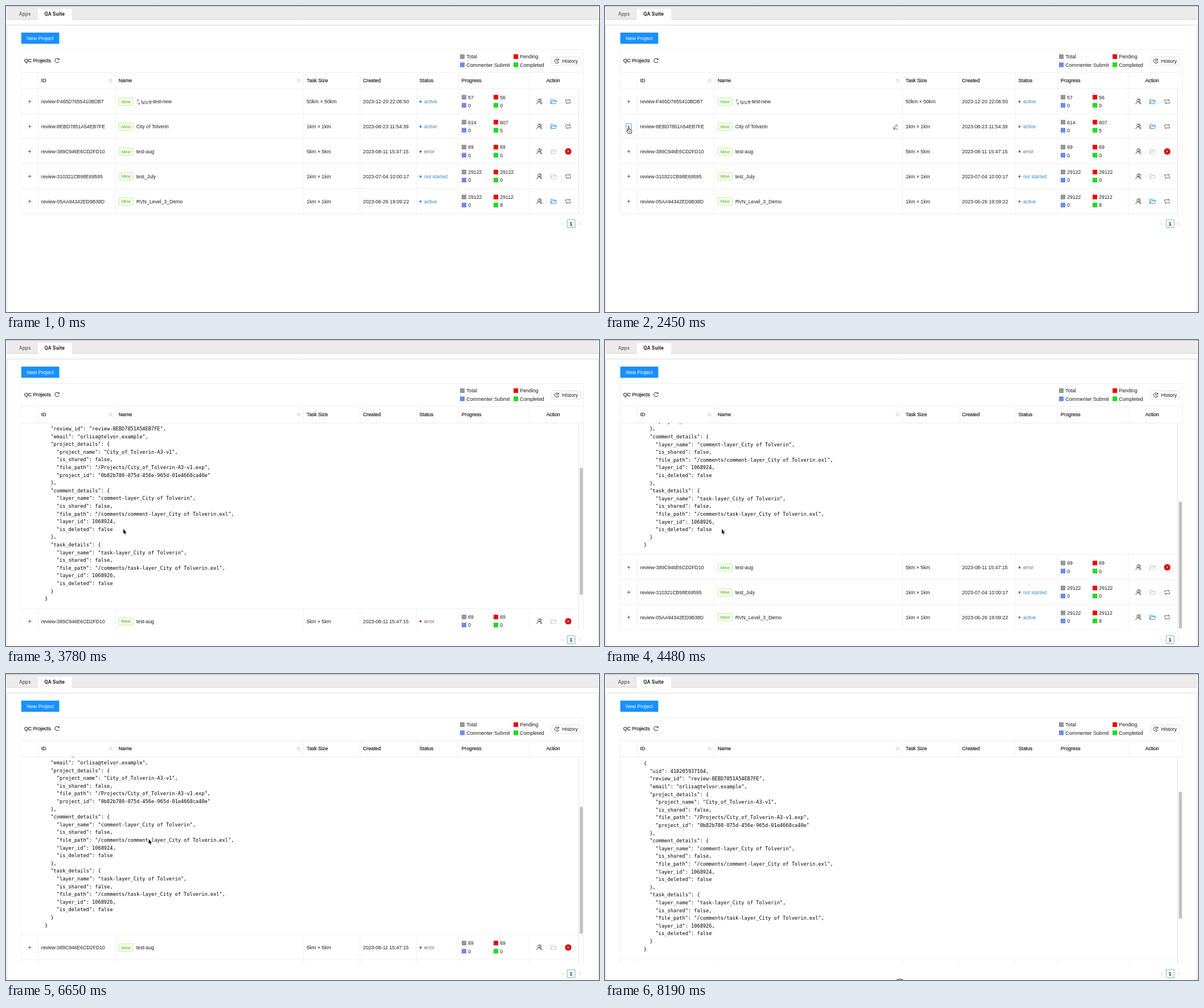
An HTML page with a canvas for the animation above (8260 ms loop, 1041 px wide and 538 px high).

```html
<!DOCTYPE html>
<html lang="en">
<head>
<meta charset="utf-8">
<title>Review projects</title>
<style>
html, body { margin: 0; width: 100%; height: 100%; overflow: hidden; background: #fff; }
canvas { display: block; width: 1041px; height: 538px; }
</style>
</head>
<body>
<canvas id="stage"></canvas>
<script>
const W = 1041, H = 538, LOOP = 8260;
const canvas = document.getElementById('stage');
const ctx = canvas.getContext('2d');
const dpr = window.devicePixelRatio || 1;
canvas.width = W * dpr;
canvas.height = H * dpr;

const SANS = '"Liberation Sans", Arial, sans-serif';
const MONO = '"DejaVu Sans Mono", monospace';
const TAB = 'Roboto, sans-serif';
const INK = '#1a1a1a', LINE = '#f0f0f0', BLUE = '#1890ff';
const GREY = '#999', RED = '#f00000', PERI = '#6c8cf0', GREEN = '#1ce01c';

const TOP = 146, ROW = 43.87, PANEL = 361.6, VIEW = 363.5;
const EXPAND_AT = 2520;
const COLS = [56.5, 192.5, 522.5, 621.5, 720.5, 794.5, 918.5];

const rows = [
  ['review-F465D7655410BDB7', '-test-new', '50km × 50km', '2023-12-20 22:06:50', 'active', 57, 56, 0, 0],
  ['review-8EBD7851A54EB7FE', 'City of Tolverin', '1km × 1km', '2023-08-23 11:54:39', 'active', 614, 607, 0, 5],
  ['review-389C946E6CD2FD10', 'test-aug', '5km × 5km', '2023-08-11 15:47:15', 'error', 69, 69, 0, 0],
  ['review-310321CB98E69595', 'test_July', '1km × 1km', '2023-07-04 10:00:17', 'not started', 29122, 29122, 0, 0],
  ['review-05AA94342ED9B38D', 'RVN_Level_3_Demo', '1km × 1km', '2023-06-26 19:09:22', 'active', 29122, 29112, 0, 8]
];

const layer = (kind, id) => ({
  layer_name: kind + '-layer_City of Tolverin',
  is_shared: false,
  file_path: '/comments/' + kind + '-layer_City of Tolverin.exl',
  layer_id: id,
  is_deleted: false
});
const details = JSON.stringify({
  uid: 418205937164,
  review_id: rows[1][0],
  email: 'orlisa@telvor.example',
  project_details: {
    project_name: 'City_of_Tolverin-A3-v1',
    is_shared: false,
    file_path: '/Projects/City_of_Tolverin-A3-v1.exp',
    project_id: '0b82b780-075d-456e-965d-01e4668ca40e'
  },
  comment_details: layer('comment', 1068924),
  task_details: layer('task', 1068926)
}, null, 2).split('\n');

// keys: [time, value, ...]
const pointerKeys = [
  [0, 517, 556], [70, 510, 542], [840, 62, 226], [1260, 41.5, 213], [2750, 41.5, 213],
  [3150, 206, 332], [4300, 206, 332], [4480, 205, 332], [5460, 205, 332],
  [5850, 250.5, 290], [6800, 250.5, 290], [7210, 517, 556]
];
const scrollKeys = [
  [3150, 0], [3780, 122.6], [4480, 217.6], [5850, 217.6],
  [6160, 189.5], [6370, 174], [6510, 174], [6650, 136.7], [7050, 94.5]
];

// Monotone cubic through the keys
function sample(keys, t, c) {
  const n = keys.length - 1;
  if (t <= keys[0][0]) return keys[0][c];
  if (t >= keys[n][0]) return keys[n][c];
  let i = 0;
  while (t > keys[i + 1][0]) i++;
  const slope = k => k < 0 || k >= n ? 0 : (keys[k + 1][c] - keys[k][c]) / (keys[k + 1][0] - keys[k][0]);
  const tangent = k => {
    const a = slope(k - 1), b = slope(k);
    return a * b <= 0 ? 0 : 2 * a * b / (a + b);
  };
  const h = keys[i + 1][0] - keys[i][0], u = (t - keys[i][0]) / h;
  const v = u * u * (3 - 2 * u);
  return keys[i][c] * (1 - v) + keys[i + 1][c] * v
    + h * u * (1 - u) * ((1 - u) * tangent(i) - u * tangent(i + 1));
}

function text(s, x, mid, color = INK, size = 8.7, family = SANS, weight = 400) {
  ctx.font = `${weight} ${size}px ${family}`;
  ctx.fillStyle = color;
  ctx.fillText(s, x, mid + size * 0.36);
}
function medium(s, x, mid, size = 8.7) {
  text(s, x, mid, INK, size);
  ctx.strokeStyle = INK;
  ctx.lineWidth = 0.2;
  ctx.strokeText(s, x, mid + size * 0.36);
}
function fill(x, y, w, h, color) {
  ctx.fillStyle = color;
  ctx.fillRect(x, y, w, h);
}
function line(x1, y1, x2, y2, color = LINE, width = 1) {
  ctx.strokeStyle = color;
  ctx.lineWidth = width;
  ctx.beginPath();
  ctx.moveTo(x1, y1);
  ctx.lineTo(x2, y2);
  ctx.stroke();
}
function box(x, y, w, h, r, stroke, bg) {
  ctx.beginPath();
  ctx.roundRect(x, y, w, h, r);
  if (bg) { ctx.fillStyle = bg; ctx.fill(); }
  if (stroke) { ctx.strokeStyle = stroke; ctx.lineWidth = 0.8; ctx.stroke(); }
}
function dot(x, y, r, color) {
  ctx.fillStyle = color;
  ctx.beginPath();
  ctx.arc(x, y, r, 0, 7);
  ctx.fill();
}
function icon(d, x, y, color, width = 0.9) {
  ctx.save();
  ctx.translate(x, y);
  ctx.strokeStyle = color;
  ctx.lineWidth = width;
  ctx.stroke(new Path2D(d));
  ctx.restore();
}
function swatch(x, mid, color) {
  fill(x, mid - 4, 8, 8, color);
  ctx.strokeStyle = 'rgba(0,0,0,.14)';
  ctx.lineWidth = 0.6;
  ctx.strokeRect(x + 0.3, mid - 3.7, 7.4, 7.4);
}

const ICONS = {
  search: 'M2 -.5A2.4 2.4 0 1 1 -2.8 -.5A2.4 2.4 0 1 1 2 -.5M1.3 1.3L3.3 3.3',
  reload: 'M3 -2.4A3.7 3.7 0 1 0 3.5 1.4M3.7 -4V-1.7H1.3',
  history: 'M2.8 -2.5A3.8 3.8 0 1 0 3.7 1M3.5 -3.7V-1.6H1.5M0 -2.2V.5L1.8 1.5',
  users: 'M1.4 -1.8A2 2 0 1 1 -2.6 -1.8A2 2 0 1 1 1.4 -1.8M-4.7 4.7Q-3.9 1 -.6 .3Q2 1 2.6 4.7M-.6 -4.6Q3.4 -5.4 3.7 -2.2Q3.6 -.2 1.6 .4Q4.2 1.4 4.8 4.6',
  folder: 'M-4.9 3.8V-3.8H-1.6L-.3 -2.4H3.4V-.7M-4.9 3.8L-3 -.7H5.3L3.5 3.8Z',
  repeat: 'M-4.2 .6V-2.7H3.6M2.2 -4.1L3.8 -2.7L2.2 -1.3M4.2 -.6V2.7H-3.6M-2.2 1.3L-3.8 2.7L-2.2 4.1',
  edit: 'M-3.2 1.8L2 -3.4L3.6 -1.8L-1.6 3.2L-3.5 3.4ZM-4 4.6H4'
};

function drawFrame(open) {
  fill(0, 0, W, H, '#fff');
  fill(1, 0, W - 2, 24, '#ebebeb');
  line(0, 0.5, W, 0.5, '#b9b9b9');
  line(1, 23.5, W - 1, 23.5, '#d6d6d6');
  fill(56, 5, 60, 19, '#fff');
  ctx.letterSpacing = '0.2px';
  text('Apps', 23, 13.7, '#666', 8.7, TAB, 500);
  text('QA Suite', 67.5, 13.7, '#222', 8.7, TAB, 700);
  ctx.letterSpacing = '0px';

  ctx.strokeStyle = '#dcdcdc';
  ctx.lineWidth = 1;
  ctx.strokeRect(1.5, 33.5, 1038, 520);

  box(26.8, 46.8, 66.7, 19.6, 1, null, BLUE);
  text('New Project', 36.5, 56.7, '#fff', 8.75);

  const bottom = open ? TOP + VIEW : TOP + ROW * 5;
  ctx.strokeStyle = LINE;
  ctx.strokeRect(26.5, 76.5, 987, (open ? TOP : bottom) - 76.5);
  medium('QC Projects', 32, 95.7, 8.7);
  icon(ICONS.reload, 89.5, 96, INK, 1);

  swatch(797, 89, GREY);
  text('Total', 808.3, 89.2, INK, 8.85);
  swatch(891, 89, RED);
  text('Pending', 902, 89.2, INK, 8.85);
  swatch(797, 103.4, PERI);
  text('Commenter Submit', 808.3, 103.5, INK, 8.85);
  swatch(891, 103.4, GREEN);
  text('Completed', 902, 103.5, INK, 8.85);
  box(958, 89.5, 50.5, 14.5, 1, '#d9d9d9', '#fff');
  icon(ICONS.history, 967, 96.8, INK, 0.9);
  text('History', 976.3, 97, INK, 8.85);

  line(27, 116.5, 1013, 116.5);
  line(27, 145.5, 1013, 145.5);
  COLS.forEach(x => line(x, 117, x, 146));
  const heads = ['ID', 'Name', 'Task Size', 'Created', 'Status', 'Progress'];
  heads.forEach((s, i) => medium(s, COLS[i] + 5.3, 131.2));
  medium('Action', 948.5, 131.2);
  icon(ICONS.search, 183.7, 131.2, '#bfbfbf');
  icon(ICONS.search, 513.8, 131.2, '#bfbfbf');

  const py = bottom + 17.4;
  icon('M1.6 -3L-1.6 0L1.6 3', 977.3, py, '#bbb', 0.8);
  box(985.2, py - 7, 13.8, 14, 1, '#489fc8', '#fff');
  text('1', 989.6, py, INK, 8.7, SANS, 700);
  icon('M-1.6 -3L1.6 0L-1.6 3', 1007.2, py, '#bbb', 0.8);
}

function drawMosaic(mid) {
  fill(229.5, mid - 4, 4, 3, '#b5b5b5');
  fill(230, mid - 1, 2.5, 3.5, '#cfcfcf');
  fill(232, mid + 2.5, 3, 3, '#999');
  for (let i = 0; i < 12; i++) {
    const v = 120 + (i * 67 + 31) % 120;
    fill(237 + (i % 6) * 3, mid - 1.5 + Math.floor(i / 6) * 3, 3, 3, `rgb(${v},${v},${v})`);
  }
}

function drawRow(row, i, y, hover, onToggle, open) {
  const [id, name, size, created, status, total, pending, sent, done] = row;
  const mid = y + ROW / 2;
  COLS.forEach(x => line(x, y, x, y + ROW));
  line(27, y + ROW - 0.4, 1013, y + ROW - 0.4);

  const tint = onToggle ? BLUE : '#333';
  box(36.8, mid - 5.2, 9.8, 10.4, 1, onToggle ? '#3c8ab8' : '#f5f5f5', '#fff');
  line(38.9, mid, 44.5, mid, tint, 0.8);
  if (!(open && i === 1)) line(41.7, mid - 2.8, 41.7, mid + 2.8, tint, 0.8);

  text(id, 61.8, mid, INK, 8.65);
  box(198, mid - 6.5, 25.4, 13.2, 1, '#b7eb8f', '#f6ffed');
  text('Mine', 202.7, mid + 0.2, '#45ad20', 7.5);
  if (i === 0) drawMosaic(mid);
  text(name, i === 0 ? 255 : 228.7, mid);
  if (hover) icon(ICONS.edit, 510, mid, '#333', 0.8);
  text(size, 527.8, mid);
  text(created, 626.8, mid);

  const failed = status === 'error';
  dot(727.7, mid + 0.2, 1.9, failed ? '#86505a' : '#2f86cf');
  text(status, 734, mid, failed ? '#7d5c60' : '#3489cf');

  [[800, -7.6, GREY, total], [856, -7.6, RED, pending], [800, 6.6, PERI, sent], [856, 6.6, GREEN, done]]
    .forEach(([x, dy, color, n]) => {
      swatch(x, mid + dy, color);
      text(n, x + 11.2, mid + dy + 0.2);
    });

  icon(ICONS.users, 936.3, mid, '#333');
  line(948.8, mid - 4, 948.8, mid + 4, '#ececec');
  icon(ICONS.folder, 961.3, mid, status === 'active' ? '#2386d8' : '#c4c4c4');
  line(974.3, mid - 4, 974.3, mid + 4, '#ececec');
  if (failed) {
    dot(987, mid, 5.6, '#d00000');
    icon('M-1.8 -1.8L1.8 1.8M1.8 -1.8L-1.8 1.8', 987, mid, '#fff', 0.9);
  } else {
    icon(ICONS.repeat, 986.8, mid, '#444', 0.85);
  }
}

function drawBody(open, scroll, mx, my) {
  const height = open ? VIEW : ROW * 5;
  const inside = my > TOP && my < TOP + height;
  ctx.save();
  ctx.beginPath();
  ctx.rect(26, TOP, 988, height);
  ctx.clip();
  let hand = false;
  rows.forEach((row, i) => {
    const y = TOP - scroll + ROW * i + (open && i > 1 ? PANEL : 0);
    const hover = inside && my >= y && my < y + ROW;
    const onToggle = hover && mx > 36 && mx < 48 && Math.abs(my - y - ROW / 2) < 6;
    hand = hand || onToggle;
    drawRow(row, i, y, hover, onToggle, open);
  });
  if (open) {
    const y = TOP - scroll + ROW * 2;
    details.forEach((s, i) => text(s, 68, y + 17.8 + i * 13.6, '#000', 8.64, MONO));
    line(27, y + PANEL - 0.4, 1005, y + PANEL - 0.4);
  }
  line(26.5, TOP, 26.5, TOP + height);
  fill(1005.5, TOP, 8, height, '#fdfdfd');
  line(1005.2, TOP, 1005.2, TOP + height, '#e0e0e0');
  line(1013.5, TOP, 1013.5, TOP + height);
  if (open) box(1007.3, 148 + scroll * 0.625, 5.4, 223.5, 2.7, null, '#c1c1c1');
  ctx.restore();
  return hand;
}

function drawPointer(x, y, hand) {
  ctx.save();
  ctx.translate(x, y);
  ctx.lineJoin = 'round';
  const shape = new Path2D(hand
    ? 'M-1 .8Q0 -.6 1 .8V4L4.8 5Q5.8 5.4 5.6 7L4.8 11H-1.2L-3.6 7.4Q-3.8 5.8 -2.4 6L-1 7Z'
    : 'M0 .3V8.6L1.8 7L3.1 9.9L4.4 9.3L3.2 6.5H5.6Z');
  ctx.strokeStyle = hand ? '#111' : '#fff';
  ctx.lineWidth = hand ? 0.9 : 1.4;
  ctx.fillStyle = hand ? '#fff' : '#111';
  if (hand) ctx.fill(shape);
  ctx.stroke(shape);
  if (!hand) ctx.fill(shape);
  if (hand) icon('M1 6.6V9M2.7 6.8V9', 0, 0, '#111', 0.6);
  ctx.restore();
}

function drawRing() {
  ctx.strokeStyle = '#222';
  ctx.lineWidth = 1.1;
  ctx.beginPath();
  ctx.arc(517.5, 547.5, 11, 0, 7);
  ctx.stroke();
}

function render(t) {
  ctx.setTransform(dpr, 0, 0, dpr, 0, 0);
  const open = t >= EXPAND_AT;
  const mx = sample(pointerKeys, t, 1), my = sample(pointerKeys, t, 2);
  drawFrame(open);
  const hand = drawBody(open, sample(scrollKeys, t, 1), mx, my);
  if (my < H) drawPointer(mx, my, hand);
  if (t >= 8190) drawRing();
}

const start = performance.now();
function tick() {
  render((performance.now() - start) % LOOP);
  requestAnimationFrame(tick);
}
tick();
</script>
</body>
</html>
```
